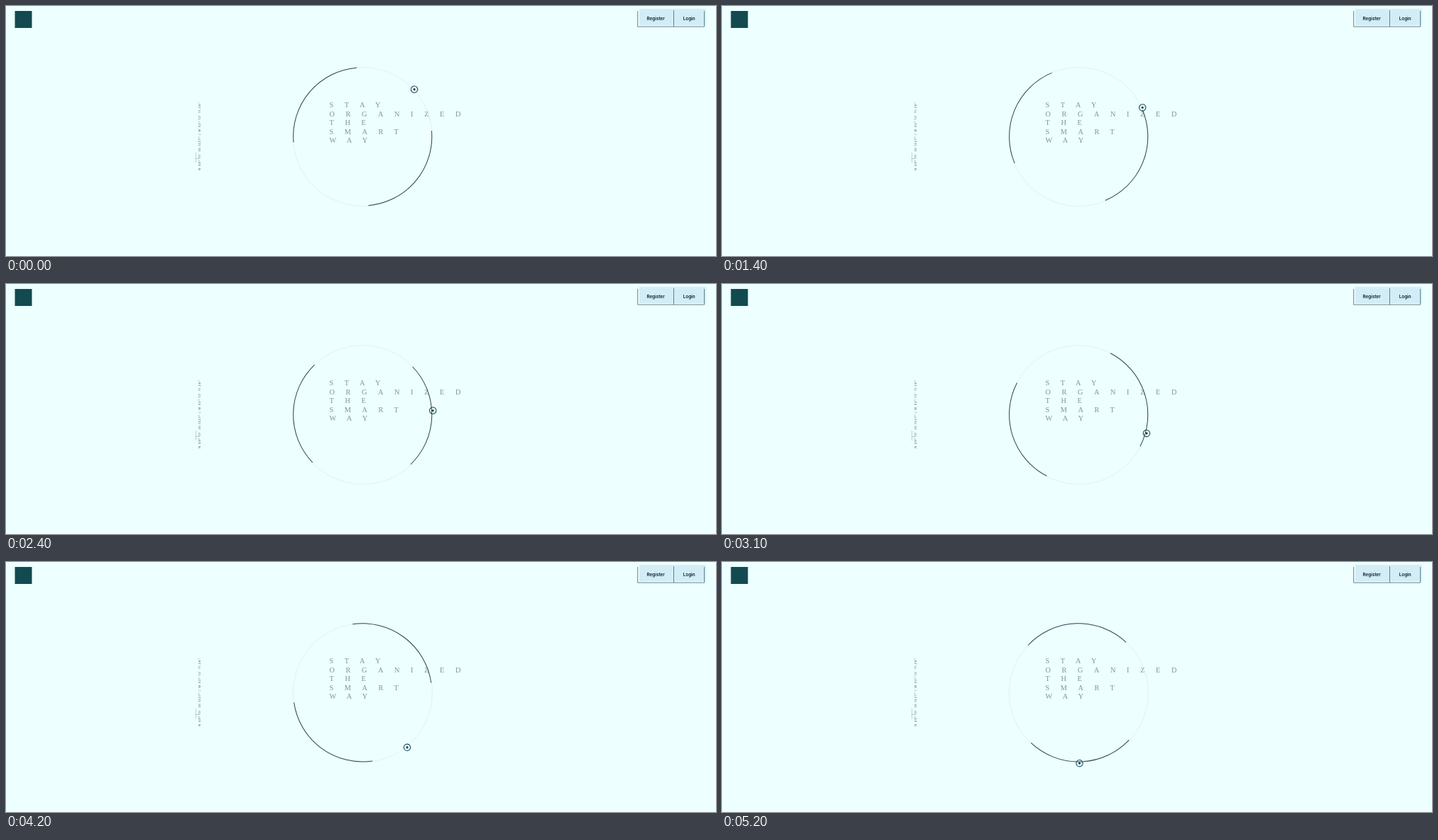
Recreate the animation shown at these times as an HTML page. Size 1000 by 353 pixels, loop 5.3 s.

```html
<!DOCTYPE html>
<html lang="en">
<head>
<meta charset="utf-8">
<title>Stay organized</title>
<style>
  html, body { margin: 0; width: 100%; height: 100%; overflow: hidden; background: #edfffe; }
  svg { display: block; width: 100%; height: 100%; }
  .headline { font: 10.3px "Liberation Serif", serif; font-kerning: normal; letter-spacing: 15.6px; fill: #7897a0; }
  .label { font: 600 6.3px Inter, sans-serif; fill: #0b1c2c; text-anchor: middle; }
  .coords { font: 4px Inter, sans-serif; letter-spacing: .74px; fill: #41585f; }
  .line { fill: none; stroke: #244c58; }
</style>
</head>
<body>
<svg viewBox="0 0 1000 353" preserveAspectRatio="none">
  <rect width="1000" height="353" fill="#edfffe"/>

  <rect x="12.5" y="7" width="24" height="24" fill="#124a50"/>

  <g>
    <rect x="892" y="4" width="94" height="23.5" fill="#c9e9fb" opacity=".7"/>
    <rect x="893" y="6" width="47" height="21" fill="#d3edf6"/>
    <rect x="943" y="6" width="40" height="21" fill="#d3edf6"/>
    <path class="line" d="M889.7 7V29.2H983.5V7M940.5 6V29" stroke-width=".9" opacity=".75"/>
    <text class="label" x="915.2" y="19.8">Register</text>
    <text class="label" x="962.2" y="19.8">Login</text>
  </g>

  <text class="coords" transform="translate(273.8 231.8) rotate(-90)">N 48° 10' 35.1227" / W 02° 12' 11.26"</text>
  <path class="line" d="M267.5 207V221M267 215.5H272" stroke-width=".6" opacity=".4"/>

  <g class="headline" id="headline"></g>

  <circle cx="502.4" cy="184.7" r="98" fill="none" stroke="#d9f0f0" stroke-width=".8"/>
  <g transform="translate(502.2 184.4)">
    <g id="arcs" class="line" stroke-width="1">
      <path d="M0 -97.6A97.6 97.6 0 0 0 -97.6 0"/>
      <path d="M0 97.6A97.6 97.6 0 0 0 97.6 0"/>
    </g>
  </g>
  <g transform="translate(502.2 185)">
    <g id="marker">
      <circle class="line" cx="99.2" r="4.7" stroke-width="1.1"/>
      <circle cx="99.2" r="1.6" fill="#1d4352"/>
    </g>
  </g>
</svg>
<script>
  const LOOP = 5300, STEP = 100;
  const byId = id => document.getElementById(id);
  const arcs = byId("arcs"), marker = byId("marker");

  ["STAY", "ORGANIZED", "THE", "SMART", "WAY"].forEach((word, i) => {
    const line = document.createElementNS("http://www.w3.org/2000/svg", "text");
    line.setAttribute("x", 455.5);
    line.setAttribute("y", 143.2 + i * 12.5);
    line.textContent = word;
    byId("headline").append(line);
  });

  // Degrees turned after s seconds, gathering speed.
  const turn = s => s * (7.68 + 3.74 * s - 0.065 * s * s);

  const rotate = (node, angle) => node.setAttribute("transform", `rotate(${angle.toFixed(3)})`);

  function draw(ms) {
    const angle = turn(Math.floor((ms % LOOP) / STEP) * STEP / 1000);
    rotate(arcs, -4.8 - angle);
    rotate(marker, -42.7 + angle);
  }

  function tick() {
    draw(performance.now());
    requestAnimationFrame(tick);
  }
  tick();
</script>
</body>
</html>
```
